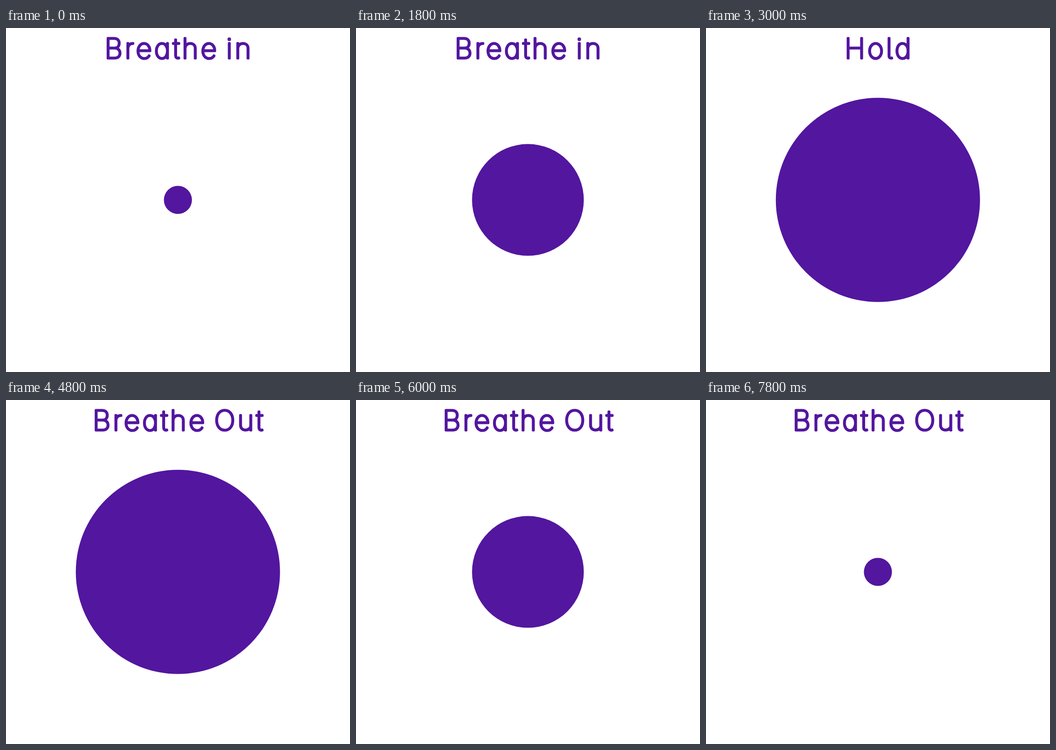
An HTML page that plays this animation: 748 by 748 pixels, repeating every 8000 ms.

```html
<!DOCTYPE html>
<html lang="en">
<head>
<meta charset="utf-8">
<title>Breathing exercise</title>
<style>
  html, body { margin: 0; width: 100%; height: 100%; overflow: hidden; background: #fff; }
  svg { display: block; width: 100vw; height: 100vh; fill: #53169f; }
  text {
    font: 100 60.5px Inter, sans-serif;
    font-feature-settings: "cv11", "cv05"; /* round a, tailed l */
    letter-spacing: 5.3px;
    word-spacing: -6.6px;
    text-anchor: middle;
    stroke: #53169f;
    stroke-width: 5px;
    stroke-linejoin: round;
    stroke-linecap: round;
  }
</style>
</head>
<body>
<svg viewBox="0 0 748 748">
  <circle id="ball" cx="373.8" cy="373.8" r="30.5"/>
  <text id="label" x="376.3" y="65.7">Breathe in</text>
</svg>
<script>
const LOOP = 8000, STEP = 600;
const DIAMETERS = [61, 122, 159, 243, 361, 444];
const TOP = DIAMETERS.length - 1;
const HOLD_STEP = 5, OUT_STEP = 8;

const ball = document.getElementById("ball");
const label = document.getElementById("label");

function caption(step) {
  if (step < HOLD_STEP) return "Breathe in";
  return step < OUT_STEP ? "Hold" : "Breathe Out";
}

// Grow one size per step, hold at the top, then shrink again.
function level(step) {
  return step < OUT_STEP ? Math.min(step, TOP) : Math.max(0, TOP - (step - OUT_STEP));
}

let shown = -1;
function draw(time) {
  const step = Math.floor((time % LOOP) / STEP);
  if (step === shown) return;
  shown = step;
  ball.setAttribute("r", DIAMETERS[level(step)] / 2);
  label.textContent = caption(step);
}

const start = performance.now();
function tick() {
  draw(performance.now() - start);
  requestAnimationFrame(tick);
}
tick();
</script>
</body>
</html>
```
